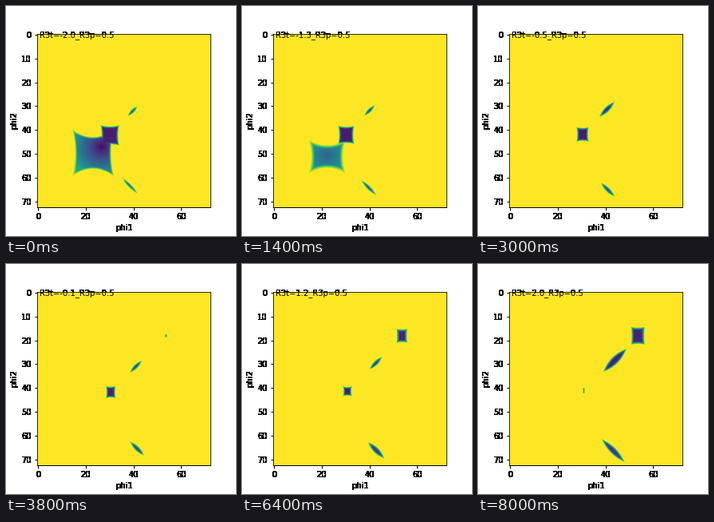
A matplotlib script that plays this animation: 288 by 288 pixels, repeating every 8200 ms.

```python
import numpy as np
import matplotlib.pyplot as plt
from matplotlib.animation import FuncAnimation
from matplotlib.transforms import Bbox, IdentityTransform

FRAMES, STEP_MS = 41, 200
CELLS, CELL, X0, Y0 = 73, 2.979, 40.37, 36.05  # grid size, px per cell, px of cell 0

plt.rcParams.update({"font.family": "DejaVu Sans", "font.size": 10})

# All shapes are given in stage pixels, measured from the top left.
side = np.linspace(-0.5, CELLS - 0.5, 3 * CELLS + 1)
mid = (side[1:] + side[:-1]) / 2 * CELL
PX, PY = np.meshgrid(mid + X0, mid + Y0)


def pad(x, y, hx, hy, soft, pinch_x=0.0, pinch_y=0.0):
    """Soft rectangle whose sides bend inwards between its corners."""
    u, v = abs(PX - x), abs(PY - y)
    bend_x = 1 - pinch_x * (1 - np.clip(v / hy, 0, 1) ** 2)
    bend_y = 1 - pinch_y * (1 - np.clip(u / hx, 0, 1) ** 2)
    return np.clip(np.minimum(hx * bend_x - u, hy * bend_y - v) / soft, 0, 1)


def streak(x, y, half, width, slope):
    """Soft lens along a diagonal; slope is 1 for falling, -1 for rising."""
    dx, dy = (PX - x) / np.sqrt(2), slope * (PY - y) / np.sqrt(2)
    lens = width * (1 - ((dx + dy) / half) ** 2) - abs(dx - dy)
    return np.clip(lens / 3, 0, 1)


def body(t):
    """Large patch that fades while it shrinks to a dot."""
    def key(*values):
        return np.interp(t, [-2, -1.3, -0.8], values)

    cover = pad(key(108.5, 106, 100), key(184.5, 189, 187),
                key(26.5, 23.5, 0.1), key(30, 21.5, 0.1),
                key(3, 5, 4), 0.15, 0.33)
    focus = np.hypot(PX - key(119, 106, 100), PY - key(177, 187, 187)) / CELL
    tone = key(0.03, 0.32, 1) + key(0.042, 0.025, 0) * focus
    return cover * (1 - np.clip(tone, 0, 1))


def left_pad(t):
    times = [-2, -0.9, -0.1, 1.2, 2]
    hx = np.interp(t, times, [12, 9.5, 6.5, 6, 1.5])
    hy = np.interp(t, times, [13, 11, 8, 6.5, 4])
    return 0.92 * pad(130.5 + 0.6 * t, 161 - 0.8 * t, hx, hy, 2.8, 0.12, 0.12)


def right_pad(t):
    size = np.sqrt(max(t + 0.2, 1e-6) / 2.2)
    return 0.9 * pad(200, 90, 9 * size, 11.5 * size, 3.5, 0.08, 0.08)


def upper_streak(t):
    half = 9 + 5 * np.exp(-4 * (t + 0.6) ** 2) + 1.5 * max(t, 0) ** 3
    return 0.9 * streak(163 + 3.2 * t + 0.5 * t**2, 128 - 2.75 * t - 0.5 * t**2,
                        half, 0.6 + 0.22 * half, -1)


def lower_streak(t):
    half = 12.7 + 0.6 * t**2 + 0.75 * max(t, 0) ** 3
    return 0.85 * streak(164.5 + 3.6 * t - 0.6 * t**2, 231.5 + 2.2 * t - 0.5 * t**2,
                         half, 3.4 + 0.5 * t, 1)


PARTS = [body, left_pad, right_pad, upper_streak, lower_streak]


def field(t):
    return 1 - np.max([part(t) for part in PARTS], axis=0)


def harden(img, dpi):
    """Turn every touched pixel solid black."""
    out = img.copy()
    out[out[..., 3] > 0] = (0, 0, 0, 1)
    return out, 0, 0


fig, ax = plt.subplots(figsize=(4, 4), dpi=72, facecolor="white")
fig.subplots_adjust(left=0.125, right=0.9, bottom=0.125, top=0.88)
im = ax.imshow(field(-2), cmap="viridis", vmin=0, vmax=1, interpolation="nearest",
               extent=(-0.5, CELLS - 0.5, CELLS - 0.5, -0.5))
ax.set_xticks(range(0, 70, 20))
ax.set_yticks(range(0, 80, 10))
ax.set_xlabel("phi1")
ax.set_ylabel("phi2")
ax.tick_params(width=1)
for name, spine in ax.spines.items():
    spine.set_linewidth(1 if name == "bottom" else 0.8)
for label in [*ax.get_xticklabels(), *ax.get_yticklabels(),
              ax.xaxis.label, ax.yaxis.label]:
    label.set_agg_filter(harden)

# The caption is solid above the axes and smooth on the plot.
captions = [fig.text(42, 249, "", transform=IdentityTransform()) for _ in range(2)]
captions[1].set_agg_filter(harden)
captions[1].set_clip_box(Bbox([[0, 253], [288, 288]]))
captions[1].set_clip_on(True)


def update(i):
    t = (i - 20) / 10
    im.set_data(field(t))
    for c in captions:
        c.set_text(f"R3t={t:.1f}_R3p=0.5")
    return [im, *captions]


anim = FuncAnimation(fig, update, frames=FRAMES, interval=STEP_MS, repeat=True)
plt.show()
```
